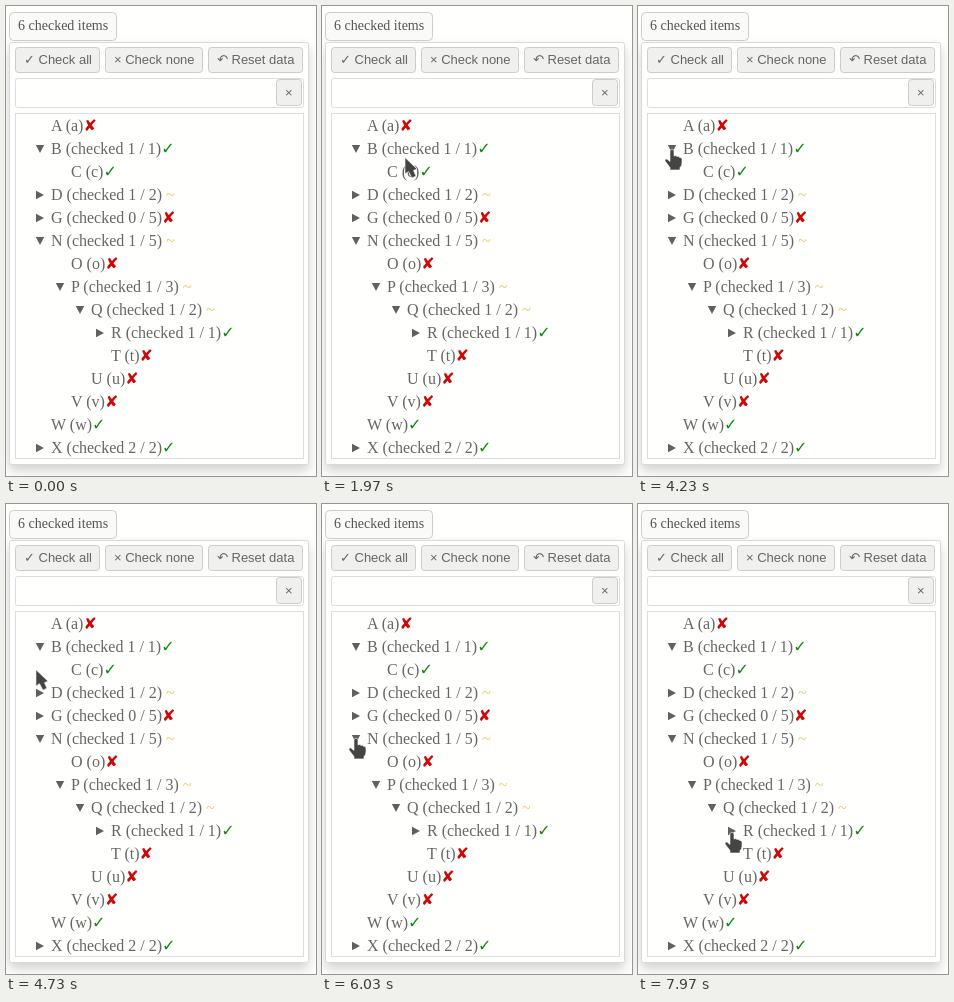
Animation, 310 px wide and 470 px high, one loop 8 s. Source, as an HTML page:

```html
<!DOCTYPE html>
<html lang="en">
<head>
<meta charset="utf-8">
<title>Tree select</title>
<style>
html, body { margin: 0; width: 310px; height: 470px; overflow: hidden; background: #fffffd; }
svg { display: block; }
text { fill: #666; font: 16px "Liberation Serif", "Times New Roman", "DejaVu Sans", serif; }
.small { font-size: 14px; fill: #555; }
.ui text { font: 13px "Liberation Sans", Arial, "DejaVu Sans", sans-serif; }
.button { fill: #f0f0ee; stroke: #ccc; }
.field { fill: #fffffd; stroke: #ddd; }
.mark { font-family: "DejaVu Sans", sans-serif; }
.yes { fill: #0a8a0a; }
.no { fill: #cc0808; }
.part { fill: #efc463; }
.twistie { fill: #606060; }
#panel { fill: #fffffd; stroke: #d9d9d9; filter: drop-shadow(0 6px 6px rgba(0, 0, 0, .175)); }
#cursor path { fill: #444; stroke: #fff; stroke-width: .6; stroke-linejoin: round; }
</style>
</head>
<body>
<svg width="310" height="470" viewBox="0 0 310 470">
  <rect id="panel" x="3.5" y="36.5" width="299" rx="2"/>
  <rect x="3.5" y="6.5" width="107" height="28" rx="4" class="button" style="fill:#fafaf8"/>
  <text x="12" y="24" class="small">6 checked items</text>
  <g class="ui">
    <rect class="button" x="9.5" y="41.5" width="84" height="25" rx="3"/>
    <rect class="button" x="99.5" y="41.5" width="97" height="25" rx="3"/>
    <rect class="button" x="202.5" y="41.5" width="94" height="25" rx="3"/>
    <text x="18" y="58">✓ Check all</text>
    <text x="108" y="58">× Check none</text>
    <text x="211" y="58">↶ Reset data</text>
    <rect class="field" x="9.5" y="72.5" width="288" height="29" rx="2"/>
    <rect class="button" x="270.5" y="73.5" width="25" height="26" rx="3"/>
    <text x="279" y="91">×</text>
  </g>
  <rect id="list" class="field" x="9.5" y="107.5" width="288"/>
  <g id="rows"></g>
  <g id="cursor">
    <path id="arrow" d="M0 1.5V18L3.5 15.5L7 22L11 20L8.5 14.5L12 13Z"/>
    <path id="hand" d="M-2 1.5Q0 -1 2 1.5V7Q4 5.8 5 7.6Q7 6.6 7.6 8.5Q10 8 10 10.5V14Q10 17 8 18.5V21H-2V18.5L-7 12Q-7.5 9.5 -5 10L-2 12.5Z"/>
  </g>
</svg>
<script>
const LOOP = 8000, ROW = 23, TOP = 108;
const $ = id => document.getElementById(id);

// depth, label, state, branch
const items = [
  [0, "A (a)", "no"],
  [0, "B (checked 1 / 1)", "yes", "open"],
  [1, "C (c)", "yes"],
  [0, "D (checked 1 / 2)", "part", "shut"],
  [0, "G (checked 0 / 5)", "no", "shut"],
  [0, "N (checked 1 / 5)", "part", "open"],
  [1, "O (o)", "no"],
  [1, "P (checked 1 / 3)", "part", "open"],
  [2, "Q (checked 1 / 2)", "part", "open"],
  [3, "R (checked 1 / 1)", "yes", "shut"],
  [3, "T (t)", "no"],
  [2, "U (u)", "no"],
  [1, "V (v)", "no"],
  [0, "W (w)", "yes"],
  [0, "X (checked 2 / 2)", "yes", "shut"]
];
const marks = { yes: "✓", no: "✘", part: " ~" };
const twisties = { open: "M-4.2 -4H4.2L0 4Z", shut: "M-4 -4.2L4 0L-4 4.2Z" };

// time, x, y of the pointer tip
const path = [
  [860, -14, 98], [1070, 41, 108], [1970, 83, 150], [2850, 34, 143],
  [4260, 34, 143], [5270, 25, 190], [6050, 34, 234], [7120, 34, 234],
  [7930, 94, 328], [8000, 94, 328]
];

let visible = [], shown = null;

function foldedAt(t) {
  if (t >= 3070 && t < 4230) return "B";
  if (t >= 6300 && t < 7080) return "N";
  return "";
}

function drawTree(folded) {
  let hiding = false;
  visible = [];
  for (const [depth, label, state, branch] of items) {
    if (depth === 0) hiding = false;
    if (hiding) continue;
    hiding = label[0] === folded;
    visible.push([depth, label, state, hiding ? "shut" : branch]);
  }
  $("rows").innerHTML = visible.map(([depth, label, state, branch], i) => {
    const x = 45 + depth * 20, y = 125 + i * ROW;
    const twistie = branch
      ? `<path class="twistie" d="${twisties[branch]}" transform="translate(${x - 11} ${y - 5})"/>` : "";
    const font = state === "part" ? "" : "mark ";
    return `${twistie}<text x="${x}" y="${y}">${label}<tspan class="${font}${state}">${marks[state]}</tspan></text>`;
  }).join("");
  const height = visible.length * ROW;
  $("list").setAttribute("height", height);
  $("panel").setAttribute("height", height + 77);
}

function pointerAt(t) {
  const i = path.findIndex(p => p[0] > t);
  if (i < 1) return null;
  const [t0, x0, y0] = path[i - 1], [t1, x1, y1] = path[i];
  const u = (t - t0) / (t1 - t0), e = u * u * (3 - 2 * u);
  return [x0 + (x1 - x0) * e, y0 + (y1 - y0) * e];
}

function overTwistie(x, y) {
  const row = visible[Math.floor((y - TOP) / ROW)];
  return Boolean(row && row[3]) && Math.abs(x - 34 - row[0] * 20) < 6;
}

function frame() {
  const t = performance.now() % LOOP, folded = foldedAt(t);
  if (folded !== shown) drawTree(shown = folded);
  const tip = pointerAt(t);
  $("cursor").style.display = tip ? "" : "none";
  if (tip) {
    const hand = overTwistie(...tip);
    $("cursor").setAttribute("transform", `translate(${tip})`);
    $("hand").style.display = hand ? "" : "none";
    $("arrow").style.display = hand ? "none" : "";
  }
  requestAnimationFrame(frame);
}
frame();
</script>
</body>
</html>
```
